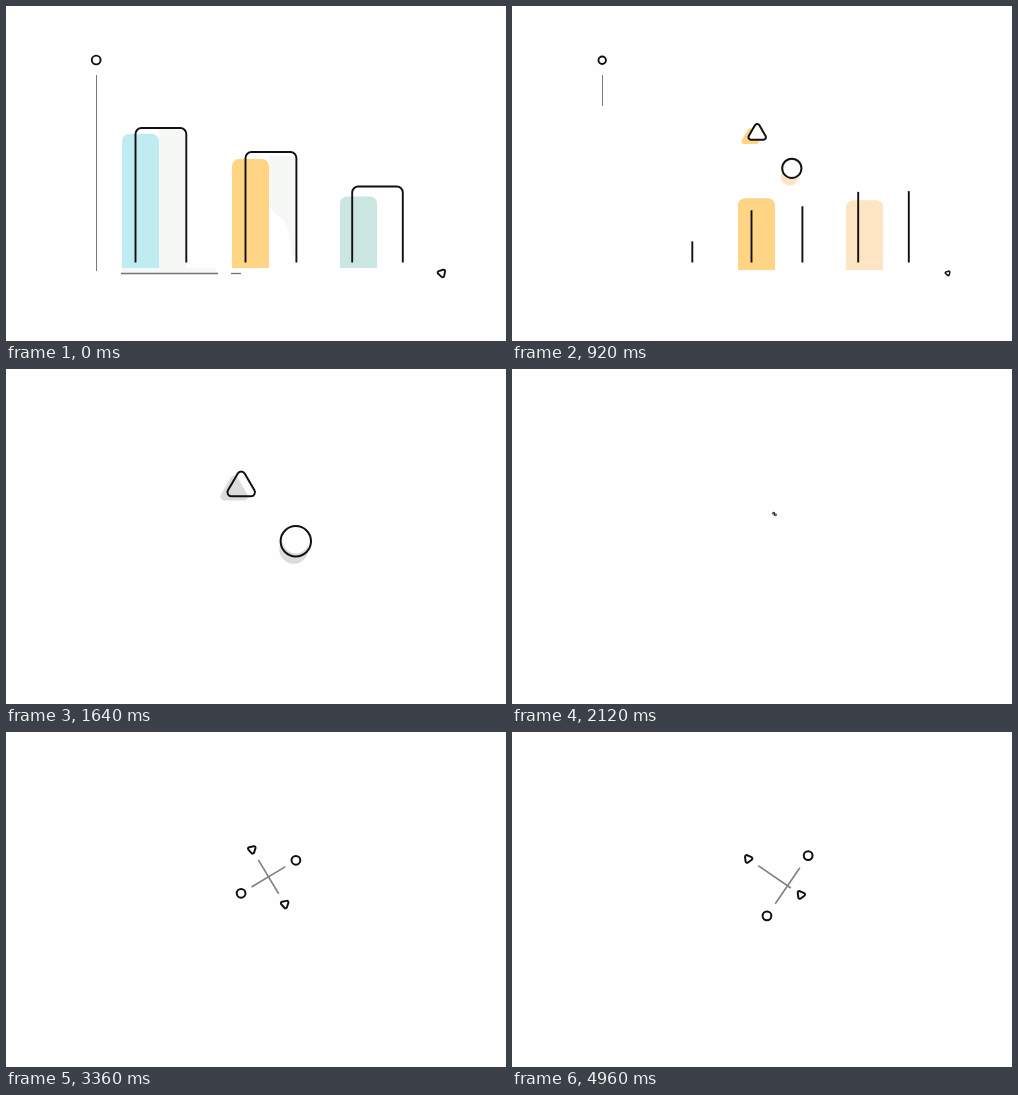
An HTML page with a canvas for the animation above (5000 ms loop, 500 by 335 pixels).

```html
<!DOCTYPE html>
<html lang="en">
<head>
<meta charset="utf-8">
<title>Chart to axes</title>
<style>
  html, body { margin: 0; width: 100%; height: 100%; overflow: hidden; background: #fefefe; }
  canvas { display: block; width: 500px; height: 335px; }
</style>
</head>
<body>
<canvas id="stage"></canvas>
<script>
const LOOP = 5000, W = 500, H = 335, INK = '#111', GREY = '#808080';
const canvas = document.getElementById('stage');
const ctx = canvas.getContext('2d');
const dpr = window.devicePixelRatio || 1;
canvas.width = W * dpr;
canvas.height = H * dpr;

const clamp = u => Math.min(1, Math.max(0, u));
const span = (t, start, dur) => clamp((t - start) / dur);
const inOut = (u, n) => u < 0.5 ? (2 * u) ** n / 2 : 1 - (2 - 2 * u) ** n / 2;
const out = u => 1 - (1 - u) ** 3;
const backOut = u => 1 + 2.7 * (u - 1) ** 3 + 1.7 * (u - 1) ** 2;
const ease = (t, start, dur, power = 3) => inOut(span(t, start, dur), power);
const mix = (a, b, u) => a + (b - a) * u;
const blend = (a, b, u) => `rgb(${a.map((v, i) => Math.round(mix(v, b[i], u)))})`;
const rad = deg => deg * Math.PI / 180;

const BLUE = [191, 236, 240], TEAL = [203, 230, 225], PEACH = [253, 228, 195];
const YELLOW = [255, 212, 133], SHADE = [220, 220, 220];

// x, top: fill; left, right, cap: outline; then the start times
const BARS = [
  { x: 116, top: 128, left: 129.5, right: 180.3, cap: 122, fillAt: 270, leftAt: 280, rightAt: 489, from: BLUE, to: BLUE },
  { x: 226, top: 153, left: 239.5, right: 290.4, cap: 146, fillAt: 636, leftAt: 576, rightAt: 584, from: YELLOW, to: YELLOW },
  { x: 334, top: 190.5, left: 346.2, right: 396.8, cap: 180.5, fillAt: 772, leftAt: 656, rightAt: 660, from: TEAL, to: PEACH }
];

function paint(fill, stroke, width) {
  if (fill) { ctx.fillStyle = fill; ctx.fill(); }
  if (stroke) { ctx.strokeStyle = stroke; ctx.lineWidth = width; ctx.stroke(); }
}

function line(x1, y1, x2, y2, colour, width) {
  ctx.beginPath();
  ctx.moveTo(x1, y1);
  ctx.lineTo(x2, y2);
  paint(null, colour, width);
}

function circle(x, y, r, fill, stroke, width) {
  if (r <= 0.2) return;
  ctx.beginPath();
  ctx.arc(x, y, r, 0, 7);
  paint(fill, stroke, width);
}

function triangle(x, y, r, angle, corner, fill, stroke, width) {
  if (r <= 0.3) return;
  const p = [0, 120, 240].map(a => [x + r * Math.cos(rad(angle + a)), y + r * Math.sin(rad(angle + a))]);
  ctx.beginPath();
  ctx.moveTo((p[2][0] + p[0][0]) / 2, (p[2][1] + p[0][1]) / 2);
  p.forEach((v, i) => ctx.arcTo(...v, ...p[(i + 1) % 3], corner));
  ctx.closePath();
  paint(fill, stroke, width);
}

function arch(left, right, top, bottom, r) {
  ctx.beginPath();
  ctx.moveTo(left, bottom);
  ctx.arcTo(left, top, right, top, r);
  ctx.arcTo(right, top, right, bottom, r);
  ctx.lineTo(right, bottom);
}

function drawBar(bar, t) {
  const base = mix(262, 264, span(t, 0, 500));
  const top = mix(bar.top, base, ease(t, bar.fillAt, 640));
  if (base - top > 0.5) {
    arch(bar.x, bar.x + 37, top, base, Math.min(7, base - top));
    paint(blend(bar.from, bar.to, span(t, 20, 200)));
  }
  const r = 6, bottom = 256.5;
  const length = 2 * (bottom - bar.cap) + bar.right - bar.left - (4 - Math.PI) * r;
  const keepLeft = length / 2 * (1 - ease(t, bar.leftAt, 640));
  const keepRight = length / 2 * (1 - ease(t, bar.rightAt, 640));
  if (keepLeft + keepRight < 0.5) return;
  arch(bar.left, bar.right, bar.cap, bottom, r);
  if (keepLeft + keepRight < length - 0.01) ctx.setLineDash([keepLeft, length - keepLeft - keepRight, keepRight + 2, 0]);
  paint(null, INK, 1.9);
  ctx.setLineDash([]);
}

function drawChart(t) {
  const fade = 1 - span(t, 20, 300);
  if (fade > 0) {
    ctx.globalAlpha = fade;
    ctx.fillStyle = '#f6f8f5';
    ctx.fillRect(153, 123, 27, 139);
    ctx.fillRect(116, 262, 94, 5);
    ctx.beginPath();
    ctx.moveTo(263, 200);
    ctx.bezierCurveTo(272, 215, 284, 205, 286, 250);
    ctx.lineTo(290, 250);
    ctx.lineTo(290, 150);
    ctx.lineTo(263, 150);
    paint('#f6f8f5');
    line(115, 267.5, mix(115, 212, fade), 267.5, '#77716a', 1.3);
    line(225, 267.5, mix(225, 235, fade), 267.5, '#77716a', 1.3);
    ctx.globalAlpha = 1;
  }
  const axis = 1 - ease(t, 499, 640);
  if (axis > 0.005) line(90.5, 69, 90.5, 69 + 196 * axis, '#777', 1);
  const ring = 1 - ease(t, 800, 360), tip = 1 - ease(t, 750, 370);
  circle(90.2, mix(55.5, 54, ring), 4.4 * ring, null, INK, 1.9);
  triangle(435.8, 267.2, 5.7 * tip, 72, 1.5 * tip, null, INK, mix(1, 1.9, tip));
  BARS.forEach(bar => drawBar(bar, t));
}

function drawPair(t) {
  const k = out(span(t, 750, 600)) * (1 - ease(t, 1720, 500));
  if (k < 0.02) return;
  const grey = span(t, 1000, 450), d = 27.3 * k, soft = Math.min(1, k * 1.6);
  const tx = 262.5 - d, ty = 145 - d, cx = 262.5 + d, cy = 145 + d;
  triangle(tx - 7 * soft, ty + 4.2 * soft, 19.3 * k, -90, 4 * k, blend(YELLOW, SHADE, grey));
  circle(cx - 2 * soft, cy + 8 * soft, 14.5 * k, blend(PEACH, SHADE, grey));
  triangle(tx, ty, 19.3 * k, -90, 4 * k, `rgba(254,254,254,${1 - grey})`, INK, 2);
  circle(cx, cy - 1.5 * grey, 15 * k - 1.5 * grey, '#fefefe');
  circle(cx, cy, 15.2 * k, null, INK, 2);
}

// one arm of the cross, with the same marker at both ends
function arm(x, y, deg, half, reach, marker) {
  const c = Math.cos(rad(deg)), s = Math.sin(rad(deg));
  line(x - half * c, y - half * s, x + half * c, y + half * s, GREY, 1.6);
  for (const side of [-1, 1]) marker(x + side * reach * c, y + side * reach * s);
}

function drawCross(t) {
  const g = backOut(span(t, 2240, 420));
  if (g < 0.02) return;
  const turn = ease(t, 2127, 2722, 4), split = ease(t, 4407, 1020);
  const deg = -45 - 225 * turn - 90 * split;
  const shift = -8 * ease(t, 3500, 800) + 38.5 * split;
  const size = Math.min(1, g), x = 262.5, y = 144.8;
  arm(x, y, deg, 19.8 * g, 31.9 * g, (mx, my) =>
    triangle(mx, my, 5.7 * size, deg - 41, 1.5 * size, null, INK, 2));
  arm(x + shift * Math.cos(rad(deg)), y + shift * Math.sin(rad(deg)), deg + 90,
    (19.8 + 3.3 * split) * g, (32 + 7.3 * split) * g, (mx, my) =>
    circle(mx, my, 4.4 * size, null, INK, 2));
}

function draw(t) {
  ctx.setTransform(dpr, 0, 0, dpr, 0, 0);
  ctx.fillStyle = '#fefefe';
  ctx.fillRect(0, 0, W, H);
  if (t < 1500) drawChart(t);
  drawPair(t);
  drawCross(t);
}

const begin = performance.now();
function tick() {
  draw((performance.now() - begin) % LOOP);
  requestAnimationFrame(tick);
}
tick();
</script>
</body>
</html>
```
